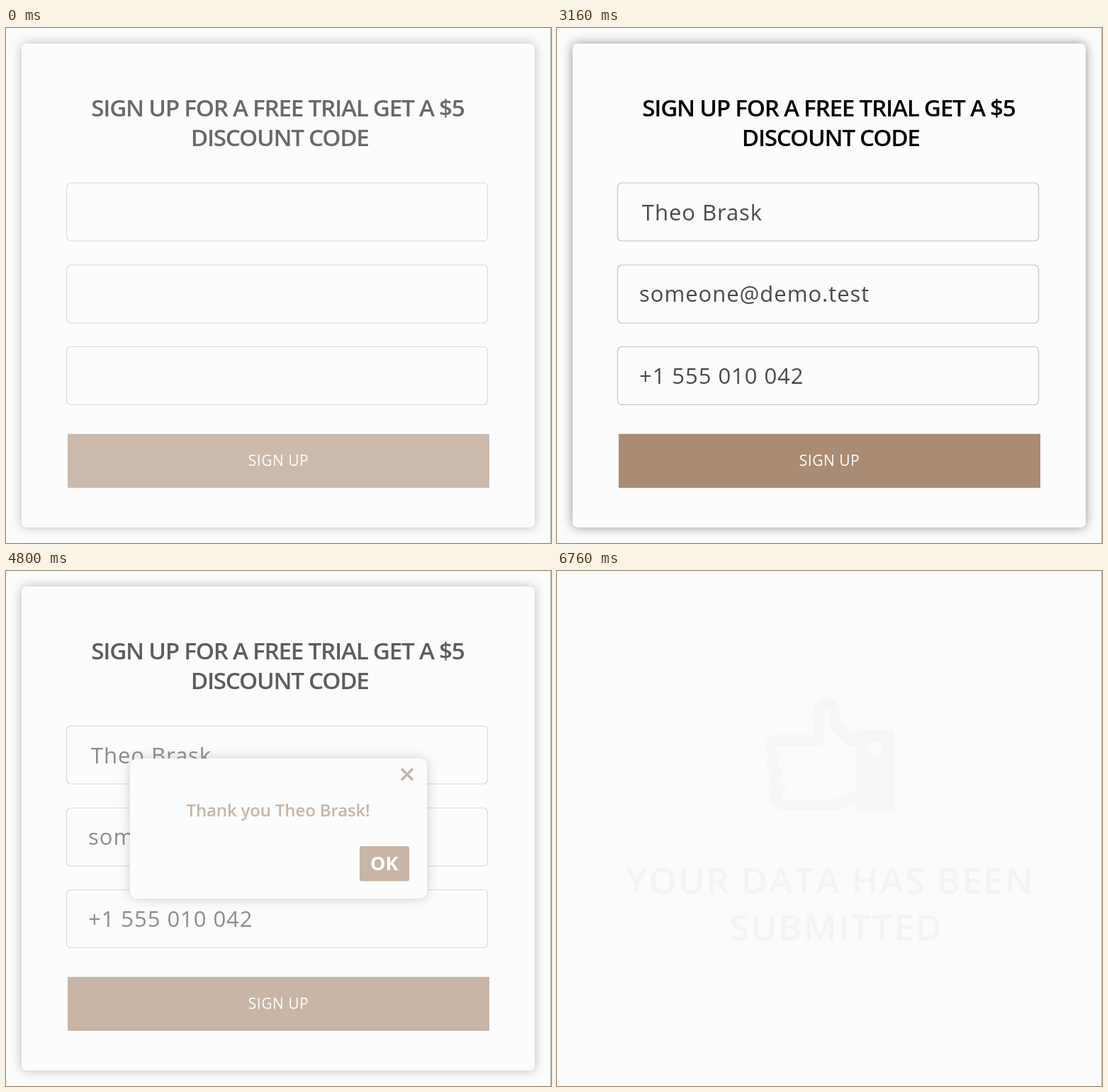
These frames come from a looping animation (769 px wide and 728 px high, 7.8 s). An HTML page with a canvas:

```html
<!DOCTYPE html>
<html lang="en">
<head>
<meta charset="utf-8">
<title>Sign up form</title>
<style>
html, body { margin: 0; width: 100%; height: 100%; overflow: hidden; background: #fbfbfb; }
canvas { display: block; }
</style>
</head>
<body>
<canvas id="stage" width="769" height="728"></canvas>
<script>
const ctx = document.getElementById('stage').getContext('2d');
const W = 769, H = 728, LOOP = 7800, STEP = 40;
const PAPER = '#fbfbfb', CARD = '#fcfcfc', BROWN = '#a98b73', INK = '#4a4a4a';

const NAME = 'Theo Brask';
const FIELDS = [
  { top: 219, x: 119.8, base: 271.5, text: NAME, start: 90, pace: 59 },
  { top: 335, x: 116, base: 387, text: 'someone@demo.test', start: 860, pace: 60 },
  { top: 450.5, x: 116, base: 502.5, text: '+1 555 010 042', start: 1895, pace: 56 }
];

const HAND = new Path2D(
  'M424 239 H411 L393 219 Q392 216 392 200 A12 12 0 0 0 368 200 L370 239 H312 ' +
  'C298 239 298 255 309 264 C301 268 301 281 312 286 C304 291 304 303 315 308 ' +
  'C305 315 308 331 323 331 H393 L424 318');

const clamp = v => Math.max(0, Math.min(1, v));

function box(x, y, w, h, r) {
  ctx.beginPath();
  ctx.roundRect(x, y, w, h, r);
}

function fillBox(x, y, w, h, r, color) {
  box(x, y, w, h, r);
  ctx.fillStyle = color;
  ctx.fill();
}

function panel(x, y, w, h, r, blur, shade) {
  ctx.save();
  ctx.shadowColor = `rgba(0,0,0,${shade})`;
  ctx.shadowBlur = blur;
  fillBox(x, y, w, h, r, CARD);
  ctx.restore();
}

function setFont(weight, size, spacing, color, align = 'left', kerning = 'auto') {
  ctx.font = `${weight} ${size}px "Open Sans", "Noto Sans", sans-serif`;
  ctx.letterSpacing = spacing + 'px';
  ctx.fontKerning = kerning;
  ctx.fillStyle = color;
  ctx.textAlign = align;
}

// Whole letters first, then the one still fading in.
function typed({ text, x, base, start, pace }, t) {
  const pos = clamp((t - start) / (pace * text.length)) * text.length;
  const n = Math.floor(pos);
  const done = text.slice(0, n);
  setFont(400, 31, 0.95, INK);
  ctx.fillText(done, x, base);
  if (n < text.length && pos > n) {
    ctx.globalAlpha = pos - n;
    ctx.fillText(text[n], x + ctx.measureText(done).width, base);
    ctx.globalAlpha = 1;
  }
}

function form(t) {
  panel(22, 22, 724, 684, 7, 15, 0.42);

  setFont(600, 33.3, -1.28, '#000');
  ctx.fillText('SIGN UP FOR A FREE TRIAL GET A $5', 120.3, 125);
  ctx.fillText('DISCOUNT CODE', 260.8, 166.5);

  for (const f of FIELDS) {
    box(85.5, f.top, 594, 82, 6);
    ctx.strokeStyle = '#c6c2bf';
    ctx.lineWidth = 1.2;
    ctx.stroke();
    typed(f, t);
  }

  const press = Math.sin(Math.PI * clamp((t - 3140) / 500));
  ctx.globalAlpha = 1 - 0.08 * press;
  fillBox(87, 573.7, 595, 76.3, 1, BROWN);
  ctx.globalAlpha = 1;
  setFont(400, 21, 0.5, '#fff');
  ctx.fillText('SIGN UP', 341.8, 619);
}

function popup() {
  panel(175, 265, 419, 198, 10, 18, 0.3);

  ctx.strokeStyle = BROWN;
  ctx.lineWidth = 3.6;
  ctx.beginPath();
  ctx.moveTo(558, 279.5);
  ctx.lineTo(574, 295.5);
  ctx.moveTo(574, 279.5);
  ctx.lineTo(558, 295.5);
  ctx.stroke();

  setFont(600, 24, -0.15, BROWN, 'center');
  ctx.fillText(`Thank you ${NAME}!`, 384, 346.5);

  fillBox(499, 389, 70, 49.5, 3, BROWN);
  setFont(700, 27, 0, '#fff', 'center');
  ctx.fillText('OK', 533.8, 422.7);
}

function thanks() {
  ctx.fillStyle = '#fff';
  ctx.fill(HAND);
  ctx.strokeStyle = BROWN;
  ctx.lineWidth = 15;
  ctx.lineJoin = 'round';
  ctx.stroke(HAND);
  fillBox(423, 225, 53, 114, 4, BROWN);
  ctx.beginPath();
  ctx.arc(449.3, 251.5, 10.7, 0, 7);
  ctx.fillStyle = '#fff';
  ctx.fill();

  setFont(600, 51, 1.75, INK, 'left', 'none');
  ctx.fillText('YOUR DATA HAS BEEN', 97, 456);
  ctx.fillText('SUBMITTED', 243, 521.5);
}

// Fades everything drawn so far towards the paper.
function veil(amount) {
  ctx.globalAlpha = clamp(amount);
  ctx.fillStyle = PAPER;
  ctx.fillRect(0, 0, W, H);
  ctx.globalAlpha = 1;
}

const layer = document.createElement('canvas');
layer.width = W;
layer.height = H;
const layerCtx = layer.getContext('2d');

// Blends the popup as one layer by laying the bare form back over it.
function blendPopup(alpha) {
  layerCtx.drawImage(ctx.canvas, 0, 0);
  popup();
  ctx.globalAlpha = 1 - alpha;
  ctx.drawImage(layer, 0, 0);
  ctx.globalAlpha = 1;
}

function draw(t) {
  veil(1);
  if (t < 5040) {
    form(t);
    const shown = clamp((t - 3620) / 220);
    if (shown === 1) popup();
    else if (shown > 0) blendPopup(shown);
    const rise = 0.42 * (1 - clamp((t - 40) / 360)) ** 2;
    const fall = clamp((t - 4060) / 950) ** 4;
    veil(Math.max(rise, fall));
  } else if (t >= 5320) {
    thanks();
    veil(((t - 6040) / 735) ** 2);
  }
  ctx.fillStyle = '#b4b4b4';
  ctx.fillRect(768, 0, 1, H);
}

const begin = performance.now();

function tick() {
  const now = (performance.now() - begin) % LOOP;
  const t = Math.min(6760, Math.floor(now / STEP) * STEP);
  draw(t < 80 ? 0 : t);
  requestAnimationFrame(tick);
}
tick();
</script>
</body>
</html>
```
